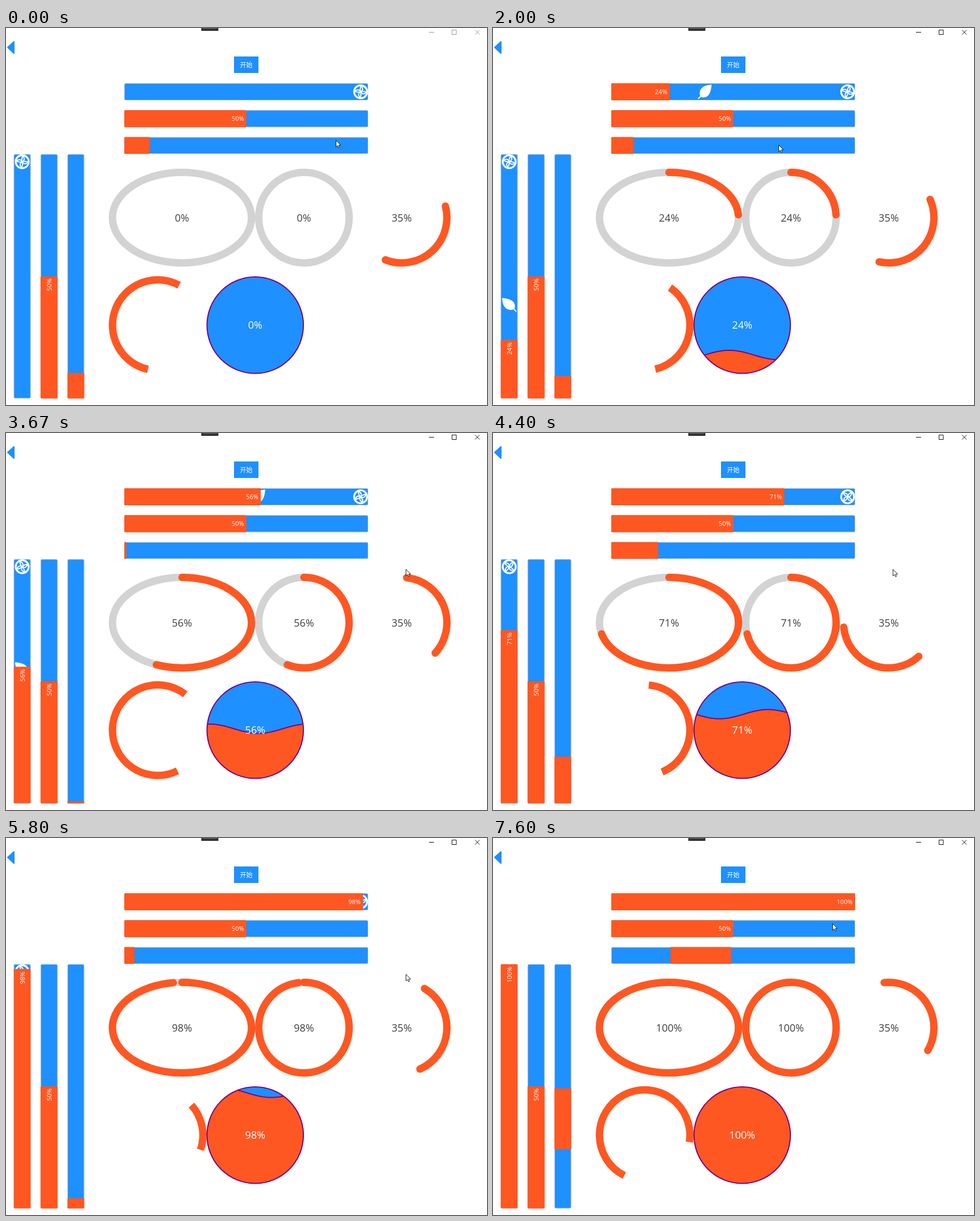
These frames come from a looping animation (846 by 662 pixels, 7.67 s). An HTML page:

```html
<!DOCTYPE html>
<html lang="zh">
<head>
<meta charset="utf-8">
<title>Progress</title>
<style>
  html, body { margin: 0; width: 100%; height: 100%; overflow: hidden; background: #fff; }
  svg { display: block; }
  text { font-family: "Open Sans", "Noto Sans", "Noto Sans CJK SC", "Noto Sans CJK", sans-serif; }
  .small { font-size: 11px; fill: #fff; text-anchor: end; }
  .big { font-size: 18px; fill: #404040; text-anchor: middle; }
  .light { fill: #fff; }
  .track { fill: #1e90ff; stroke: #a9b6c4; }
  .fill { fill: #ff5722; }
  .rail, .arc { fill: none; stroke-width: 13; }
  .rail { stroke: #d3d3d3; }
  .arc { stroke: #ff5722; stroke-linecap: round; }
  .flat { stroke-linecap: butt; }
</style>
</head>
<body>
<svg width="846" height="662" viewBox="0 0 846 662">
  <defs>
    <clipPath id="ballClip"><circle cx="438.3" cy="521.8" r="84.8"/></clipPath>
    <path id="blade" d="M0 0C4-2 5-6 1-10M0 0C-1-4-1-7 1-10"/>
    <g id="wheel" fill="none" stroke="#fff" stroke-width="1.9">
      <circle r="11.4" stroke-width="3.2"/>
      <use href="#blade"/>
      <use href="#blade" transform="rotate(90)"/>
      <use href="#blade" transform="rotate(180)"/>
      <use href="#blade" transform="rotate(270)"/>
    </g>
    <path id="leaf" fill="#fff" d="M25 2.5C24 14 21 24 12 25C9.500 25.300 8 25 6.500 24L1.500 28L.3 26.700L5 22.500C4 20.500 3.800 18 4.300 15C6 6 15 3 25 2.500Z"/>
    <g id="bars">
      <rect class="track" x=".5" y=".5" width="428" height="29" rx="2"/>
      <use class="wheel" href="#wheel"/>
      <use class="leaf" href="#leaf"/>
    </g>
  </defs>

  <rect x="343.500" width="30" height="5" fill="#2d2d2f"/>
  <rect x="346" width="25" height="2" fill="#505052"/>
  <path d="M3 34L14 24V44.500Z" fill="#1e90ff" stroke="#1e90ff" stroke-width="2" stroke-linejoin="round"/>
  <path id="chrome" fill="none" d="M744 7.500H753M784.500 3.500H792V11.500H784.500ZM825 3.500L833 11.500M833 3.500L825 11.500"/>
  <rect x="401" y="50" width="43" height="29" fill="#1e90ff"/>
  <text x="422.500" y="69" class="light" font-size="11" text-anchor="middle">开始</text>

  <g class="bars" transform="translate(208 97)"></g>
  <g class="bars" transform="translate(13.500 650.500) rotate(-90)"></g>

  <ellipse class="rail" cx="309.500" cy="333" rx="122.300" ry="79.500"/>
  <circle class="rail" cx="524" cy="333" r="79.500"/>
  <path class="arc" id="oval"/>
  <path class="arc" id="ring"/>
  <path class="arc" id="spinner"/>
  <path class="arc flat" id="chaser"/>
  <text class="big pct" x="309.500" y="339.500"></text>
  <text class="big pct" x="524" y="339.500"></text>
  <text class="big" x="696" y="339.500">35%</text>

  <circle cx="438.300" cy="521.800" r="84.800" fill="#1e90ff"/>
  <path id="wave" clip-path="url(#ballClip)" fill="#ff5722" stroke="purple" stroke-width="2"/>
  <circle cx="438.300" cy="521.800" r="84.800" fill="none" stroke="purple" stroke-width="2"/>
  <text class="big light pct" style="fill:#fff" x="438.300" y="528.300"></text>

  <path id="cursor" d="M.5 .5V12L3.200 9.500L5 13.500L6.800 12.700L5.100 8.800H8.800Z" fill="#fff" stroke="#111" stroke-width=".9"/>
</svg>
<script>
const LOOP = 7670, FRAME = 1000 / 15;
const CLICK = 730, LEAF_START = 823;
const BAR = 429, GAP = 47.3;
const $ = id => document.getElementById(id);
const all = sel => [...document.querySelectorAll(sel)];
const mod = (a, n) => ((a % n) + n) % n;

// time, x, y of the pointer
const POINTER = [
  [0, 580, 197], [200, 560, 180], [550, 428, 66], [850, 426, 64],
  [1200, 502, 205], [2400, 502, 205], [2750, 543, 201], [3200, 543, 201],
  [3600, 703, 239], [5900, 703, 239], [6350, 519, 66], [6600, 519, 66],
  [6900, 838, 130], [7200, 690, 175], [7600, 597, 150], [7670, 590, 165]
];

const barSet = `
  <rect class="track" x=".5" y=".5" width="428" height="29" rx="2"/>
  <use class="wheel" href="#wheel"/>
  <use class="leaf" href="#leaf"/>
  <svg class="level" height="30"><rect class="fill" width="100%" height="30" rx="1.500"/>
    <text class="small pct" y="19"></text></svg>
  <g transform="translate(0 ${GAP})">
    <rect class="track" x=".5" y=".5" width="428" height="29" rx="2"/>
    <rect class="fill" width="214.500" height="30" rx="1.500"/>
    <text class="small" x="210.500" y="19">50%</text>
  </g>
  <g transform="translate(0 ${GAP * 2})">
    <rect class="track" x=".5" y=".5" width="428" height="28.500" rx="2"/>
    <rect class="fill slide" height="29.500" rx="1"/>
  </g>`;
all(".bars").forEach(g => g.innerHTML = barSet);

const wheels = all(".bars .wheel"), leaves = all(".bars .leaf");
const levels = all(".level"), slides = all(".slide"), labels = all(".pct");

function set(el, attrs) {
  for (const k in attrs) el.setAttribute(k, attrs[k]);
}

// Clockwise arc in degrees from the top
function arc(cx, cy, rx, ry, from, sweep) {
  if (sweep <= 0) return "";
  const s = Math.min(sweep, 359.99);
  const at = deg => {
    const a = deg * Math.PI / 180;
    return `${(cx + rx * Math.sin(a)).toFixed(3)} ${(cy - ry * Math.cos(a)).toFixed(3)}`;
  };
  const half = `A${rx} ${ry} 0 0 1 `;
  return `M${at(from)}${half}${at(from + s / 2)}${half}${at(from + s)}`;
}

// Fast growth, slow shrink
function chaserSweep(u) {
  const c = mod(u, 4000);
  return c < 1103 ? Math.min(360, c * 0.36) : Math.max(0, 360 - (c - 1103) * 0.1248);
}

function wavePath(p, u) {
  if (p >= 100) return "M340 430H540V620H340Z";
  const top = 607 - 1.71 * p, crest = 352.5 + 0.171 * u;
  let d = "M345 625";
  for (let x = 345; x <= 531; x += 3) {
    const y = top + 8.1 * (1 - Math.cos(2 * Math.PI * (x - crest) / 171));
    d += `L${x} ${y.toFixed(2)}`;
  }
  return d + "V625Z";
}

function pointerAt(t) {
  const i = Math.max(1, POINTER.findIndex(q => q[0] >= t));
  const [t0, x0, y0] = POINTER[i - 1], [t1, x1, y1] = POINTER[i];
  const k = (t - t0) / (t1 - t0), e = k * k * (3 - 2 * k);
  return [x0 + (x1 - x0) * e, y0 + (y1 - y0) * e];
}

function draw(t) {
  const p = Math.max(0, Math.min(100, Math.floor((t - 752) / 51.3)));
  const u = t - 5632 + (t < CLICK ? 50 : 0);
  const phase = mod(u, 2000) / 2000;
  const width = BAR * p / 100;

  labels.forEach(l => l.textContent = p + "%");
  levels.forEach(l => {
    set(l, { width });
    set(l.querySelector("text"), { x: width - 4.5 });
  });

  const run = Math.max(0, t - LEAF_START);
  wheels.forEach(w => set(w, { transform: `translate(415.700 15) rotate(${run * 90 / 1062})` }));
  leaves.forEach(l => set(l, {
    transform: `translate(${404 - mod(run, 2000) * 0.2145} 0)`,
    visibility: run > 0 && p < 100 ? "visible" : "hidden"
  }));

  const right = 214.5 * phase, left = Math.max(0, right - 107);
  slides.forEach(s => set(s, { x: left, width: right - left }));

  set($("oval"), { d: arc(309.5, 333, 122.3, 79.5, 0, p * 3.6) });
  set($("ring"), { d: arc(524, 333, 79.5, 79.5, 0, p * 3.6) });
  set($("spinner"), { d: arc(696, 333, 79.5, 79.5, 360 * phase, 126) });
  set($("chaser"), { d: arc(266.8, 521.8, 79.5, 79.5, mod(0.288 * u, 360), chaserSweep(u)) });
  set($("wave"), { d: wavePath(p, u) });

  set($("chrome"), { stroke: t < CLICK ? "#999" : "#111" });
  const [x, y] = pointerAt(t);
  set($("cursor"), { transform: `translate(${Math.round(x)} ${Math.round(y)})` });
}

const start = performance.now();
function tick() {
  const t = mod(performance.now() - start, LOOP);
  draw(Math.floor(t / FRAME + 0.05) * FRAME);
  requestAnimationFrame(tick);
}
tick();
</script>
</body>
</html>
```
